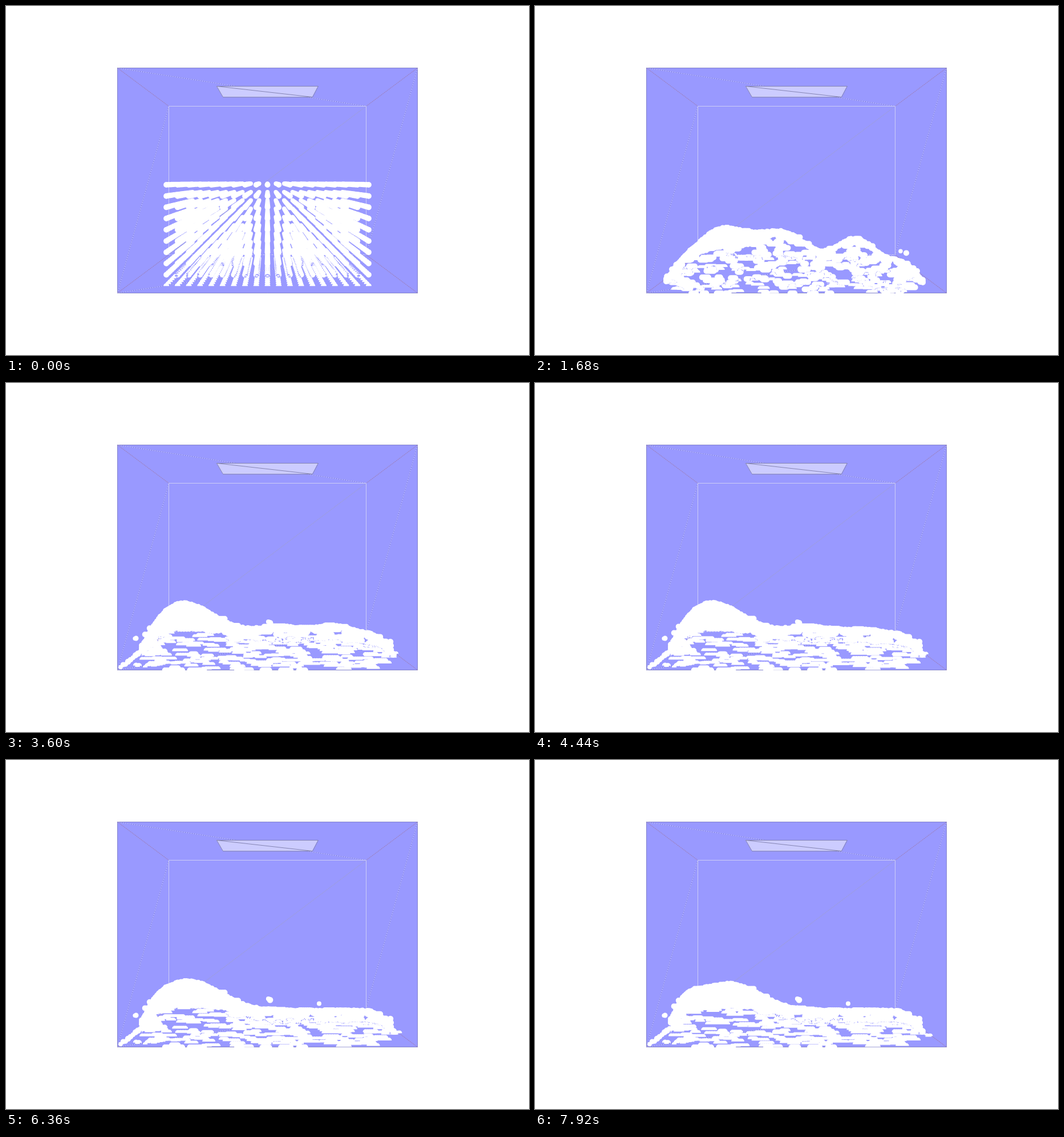
These frames come from a looping animation (917x611 px, 8000 ms). An HTML page with a canvas:

```html
<!DOCTYPE html>
<html lang="en">
<head>
<meta charset="utf-8">
<title>Particles in a box</title>
<style>
html, body { margin: 0; width: 100%; height: 100%; overflow: hidden; background: #fff; }
canvas { display: block; }
</style>
</head>
<body>
<canvas id="stage" width="917" height="611"></canvas>
<script>
const ctx = document.getElementById('stage').getContext('2d');
const LOOP = 8000, STEP = 120, FALL = 720;
const CX = 458.5, CY = 305.5, FOCAL = 1014, FLOOR = 503;
const R = 5, COLS = 19, ROWS = 10, LAYERS = 19, GROUPS = 2;

const hash = n => { const s = Math.sin(n * 12.9898) * 43758.5453; return s - Math.floor(s); };
const mix = (a, b, w) => a + (b - a) * w;

// Value at time t between key points [time, value]
function track(t, ...keys) {
  let i = 1;
  while (i < keys.length - 1 && keys[i][0] < t) i++;
  const [t0, a] = keys[i - 1], [t1, b] = keys[i];
  return mix(a, b, Math.min(1, Math.max(0, (t - t0) / (t1 - t0))));
}

// Particle lattice seen in perspective, far layers first
const particles = [];
for (let k = LAYERS - 1; k >= 0; k--)
  for (let j = 0; j < ROWS; j++)
    for (let i = 0; i < COLS; i++) {
      const scale = FOCAL / (FOCAL + 71.6 + k * 21.1);
      const clump = (Math.floor(k * GROUPS / LAYERS) * ROWS + j) * COLS + i + 1;
      particles.push({
        x: CX + (i - 9) * 21.1 * scale,
        y: CY + (8 + j * 21.08) * scale,
        r: 5.35 * scale,
        u: (i - .4 + 1.8 * hash(clump)) / COLS,
        v: (j - .4 + 1.8 * hash(clump + 4000)) / ROWS,
        spread: (k % 6 - 2.5) * (.5 + hash(clump + 6000)),
        onFloor: j === ROWS - 1,
        flatAt: j < 3 ? Infinity : 900 + hash(clump + 9000) * 2200
      });
    }

const bump = (x, center, height, left, right = left) =>
  height * Math.exp(-(((x - center) / (x < center ? left : right)) ** 2));
const corner = (distance, width) => Math.max(0, 1 - distance / width);

// Outline of the fluid: a pool with travelling swells and rounded ends
function fluidAt(t) {
  const fall = Math.min(1, t / FALL);
  const left = track(t, [0, 281], [FALL, 245], [1680, 230], [3600, 238]);
  const right = track(t, [0, 636], [FALL, 672], [1680, 680]);
  const level = track(t, [0, 308], [FALL, 405], [1680, 440], [3600, 433]);
  const crestX = track(t, [FALL, 378], [1680, 330], [3600, 315], [5280, 318], [7920, 346]);
  const crestH = track(t, [0, 0], [FALL, 62], [1680, 56], [3600, 50], [7920, 44]);
  const middleX = track(t, [FALL, 440], [1680, 437], [3600, 480]);
  const middleH = track(t, [0, 0], [FALL, 26], [1680, 44], [3600, 12], [5280, 12], [6360, 0]);
  const rightX = track(t, [FALL, 510], [1680, 560], [3600, 573]);
  const rightH = track(t, [0, 0], [FALL, 52], [1680, 38], [3600, 13], [5280, 0]);
  const lipH = track(t, [1680, 0], [3600, 8], [7920, 32]);
  const packing = track(t, [0, 0], [FALL, .12], [1680, .6], [3600, .85]);
  const cut = track(t, [FALL, 120], [1680, 22]);

  const edge = x => Math.min(x - left, right - x);
  const crest = x => bump(x, crestX, crestH, 55, 72) + bump(x, 262, lipH, 30, 52);
  return {
    left, right, fall,
    top: x => level + 38 * fall * corner(edge(x), 50) ** 2 - crest(x)
      - bump(x, middleX, middleH, 55) - bump(x, rightX, rightH, 42),
    bottom: x => FLOOR - 30 * corner(edge(x), cut),
    depth: x => 3 + packing * crest(x),
    spread: track(t, [0, 0], [FALL, 1.3], [3600, 3])
  };
}

function line(color, points, dash = []) {
  ctx.strokeStyle = color;
  ctx.lineWidth = 1;
  ctx.setLineDash(dash);
  ctx.beginPath();
  points.forEach(([x, y]) => ctx.lineTo(x + .5, y + .5));
  ctx.stroke();
}

const rect = (x0, y0, x1, y1) => [[x0, y0], [x1, y0], [x1, y1], [x0, y1]];

function drawRoom() {
  ctx.fillStyle = '#fff';
  ctx.fillRect(0, 0, 917, 611);
  ctx.fillStyle = '#9999ff';
  ctx.fillRect(195, 108, 527, 395);

  const front = rect(195, 108, 721, 502), back = rect(285, 175, 631, 435);
  line('#8383cc', [...front, front[0]]);
  front.forEach((point, i) => line('#a0708f', [point, back[i]], [1, 1]));
  line('#a2a2bd', [back[1], back[3]], [1, 1]);
  for (const [a, b] of [[front[0], back[1]], [back[0], front[3]], [front[1], back[2]], [front[3], back[2]]]) {
    line('#8585c0', [a, b], [1, 3]);
    line('#d0d0fa', [a, b], [0, 2, 1, 1]);
  }
  line('#ccccf6', [back[3], back[0], back[1], back[2]]);
  line('#ccccf6', [back[3], back[2]], [3, 2]);

  const lamp = [[369, 140], [547, 140], [537, 159], [380, 159]];
  ctx.fillStyle = '#ccccff';
  ctx.beginPath();
  lamp.forEach(([x, y]) => ctx.lineTo(x, y));
  ctx.fill();
  line('#8585b2', [...lamp, lamp[0], lamp[2]]);
}

function disc(x, y, r, flat = false) {
  ctx.moveTo(x + r, y);
  ctx.arc(x, y, r, 0, flat ? Math.PI : Math.PI * 2, flat);
}

function drawSurface(fluid) {
  const rim = [];
  for (let x = fluid.left; x <= fluid.right; x += 3)
    rim.push([x, fluid.top(x) + R + hash(rim.length + 77) * 2, fluid.depth(x)]);
  ctx.beginPath();
  rim.forEach(([x, y]) => ctx.lineTo(x, y));
  [...rim].reverse().forEach(([x, y, depth]) => ctx.lineTo(x, y + depth));
  ctx.fill();
  ctx.beginPath();
  rim.forEach(([x, y]) => disc(x, y, R));
  ctx.fill();
}

function drawParticles(t, fluid) {
  ctx.beginPath();
  for (const p of particles) {
    const home = mix(fluid.left, fluid.right, Math.min(1, Math.max(0, p.u)));
    const high = fluid.top(home) + R;
    const x = Math.min(fluid.right, Math.max(fluid.left, home + p.spread * fluid.spread));
    const y = mix(high, Math.max(high, fluid.bottom(home)), Math.min(1, Math.max(0, p.v)));
    disc(mix(p.x, x, fluid.fall), mix(p.y, y, fluid.fall), mix(p.r, R, fluid.fall),
      p.onFloor || t > p.flatAt);
  }
  ctx.fill();
}

// Uneven row of drops along a straight line
function drawSpray(x0, y0, x1, y1, count, flat) {
  ctx.beginPath();
  for (let i = 0; i < count; i++) {
    const w = i / Math.max(1, count - 1), size = 3.5 + 2 * hash(i + x0);
    const y = mix(y0, y1, w) + (hash(i + y0) - .5) * 4;
    disc(mix(x0, x1, w), y, size, flat);
  }
  ctx.fill();
}

function drawSprays(t) {
  if (t > 1200 && t < 2200) drawSpray(641, 431, 651, 434, 2);
  if (t > 2200) {
    drawSpray(201, 497, 262, 452, 15);
    drawSpray(244, 496, 300, 491, 12, true);
    drawSpray(228, 495, 233, 495, 3, true);
    drawSpray(656, 450, 659, 454, 3);
    drawSpray(674, 452, 676, 466, 3);
    const slide = track(t, [2200, 675], [LOOP, 687]);
    drawSpray(slide, slide - 204, slide + 6, slide - 204, 3, true);
  }
  if (t > 3000) {
    drawSpray(460, 417, 463, 420, 2);
    drawSpray(226, 446, 228, 446, 2);
  }
  if (t > 4500) drawSpray(549, 426, 549, 426, 1);
}

function draw(t) {
  const fluid = fluidAt(t);
  drawRoom();
  ctx.fillStyle = '#fff';
  if (t > 0) drawSurface(fluid);
  drawParticles(t, fluid);
  drawSprays(t);
}

const start = performance.now();
let shown = -1;
function tick() {
  const elapsed = Math.max(0, performance.now() - start) % LOOP;
  const t = Math.floor(elapsed / STEP) * STEP;
  if (t !== shown) draw(shown = t);
  requestAnimationFrame(tick);
}
tick();
</script>
</body>
</html>
```
